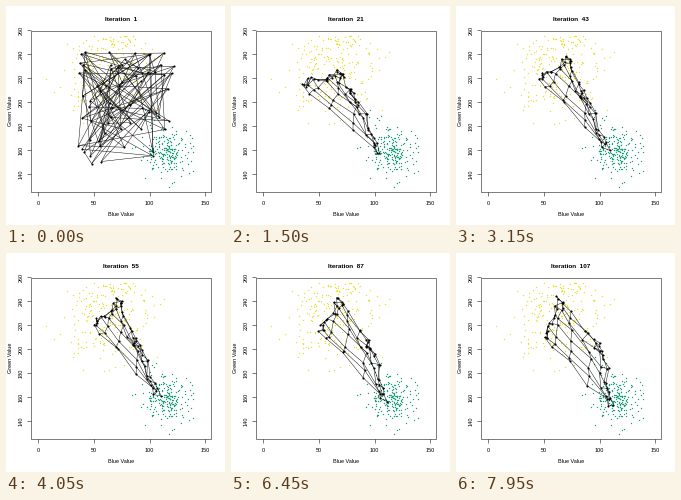
A matplotlib script for the animation above (8 s loop, 219 by 219 pixels).

```python
import numpy as np
import matplotlib.pyplot as plt
from matplotlib.animation import FuncAnimation
from matplotlib.collections import LineCollection

SIZE, DPI = 219, 100
PT = 72 / DPI            # points per pixel
FRAME_MS, LOOP_MS, STEP_MS = 50, 8000, 150
GRID = 8

plt.rcParams["font.family"] = "Liberation Sans"
rng = np.random.default_rng(11)


def smooth(x):
    return x * x * (3 - 2 * x)


# Nodes start scattered, then gather in a quad whose corners drift.
scatter = rng.uniform((70, 44), (168, 158), (GRID, GRID, 2))
offset = rng.normal(0, 2.2, (GRID, GRID, 2))
phase = rng.uniform(0, 2 * np.pi, (GRID, GRID, 2))
ramp = np.linspace(0, 1, GRID)
along = smooth(smooth(ramp))[:, None, None]
across = smooth(ramp)[None, :, None]


def corners(s):
    """Left, top, right and foot of the net at loop fraction s."""
    grow = smooth(np.clip(1.8 * s, 0, 1))
    swell = np.sin(np.pi * s)
    left = 64 + 26 * grow, 86 - 14 * swell
    top = 102 + 10 * swell, 72 - 27 * grow
    right = 115 + 28 * s, 84 + 8 * s
    foot = 150 + 7 * s, 152 - 10 * swell
    return map(np.array, (left, top, right, foot))


def net_at(step):
    t = step * STEP_MS
    left, top, right, foot = corners(t / LOOP_MS)
    upper = left + (top - left) * across
    lower = foot + (right - foot) * across
    quad = upper + (lower - upper) * along + offset
    quad = quad + np.sin(0.9 * step + phase)
    return quad + (scatter - quad) * np.exp(-t / 450)


fig = plt.figure(figsize=(SIZE / DPI, SIZE / DPI), dpi=DPI, facecolor="white")
ax = fig.add_axes([0, 0, 1, 1])
ax.set(xlim=(0, SIZE), ylim=(SIZE, 0))
ax.axis("off")


def label(x, y, text, size=5.5, **style):
    return ax.text(x, y, text, fontsize=size * PT, ha="center", **style)


def line(xs, ys):
    ax.plot(xs, ys, color="black", lw=0.5 * PT, solid_capstyle="butt")


LEFT, TOP, RIGHT, BOTTOM = 24.5, 24.5, 204.9, 186.4
line([LEFT, RIGHT, RIGHT, LEFT, LEFT], [TOP, TOP, BOTTOM, BOTTOM, TOP])
for value in range(0, 151, 50):
    x = 32 + 1.115 * value
    line([x, x], [BOTTOM, BOTTOM + 3.3])
    label(x, 198.8, str(value), va="baseline")
for value in range(140, 261, 20):
    y = 168 - 1.2 * (value - 140)
    line([LEFT - 3.3, LEFT], [y, y])
    label(15, y, str(value), rotation=90, va="center")
label(115, 210, "Blue Value", va="baseline")
label(4.5, 105, "Green Value", rotation=90, va="center")
title = label(115, 15, "", size=6.4, weight="bold", va="baseline")

for center, spread, color in [((101, 64), (23, 22), "#e6e22e"),
                              ((160, 145), (11, 12.5), "#1b9e77")]:
    x, y = rng.normal(center, spread, (220, 2)).T
    y = 30 + np.abs(y - 30)
    ax.plot(x, y, "o", ms=1.35 * PT, mew=0, color=color)

links = LineCollection([], colors="black", linewidths=0.45 * PT, zorder=3)
ax.add_collection(links)
nodes, = ax.plot([], [], "o", ms=2.1 * PT, mew=0, color="black", zorder=4)


def update(frame):
    step = frame * FRAME_MS // STEP_MS
    net = net_at(step)
    rows = np.stack([net[:, :-1], net[:, 1:]], axis=2).reshape(-1, 2, 2)
    columns = np.stack([net[:-1], net[1:]], axis=2).reshape(-1, 2, 2)
    links.set_segments(np.concatenate([rows, columns]))
    nodes.set_data(net[..., 0].ravel(), net[..., 1].ravel())
    title.set_text(f"Iteration  {2 * step + 1}")
    return links, nodes, title


anim = FuncAnimation(fig, update, frames=LOOP_MS // FRAME_MS, interval=FRAME_MS,
                     repeat=True, repeat_delay=0)
plt.show()
```
